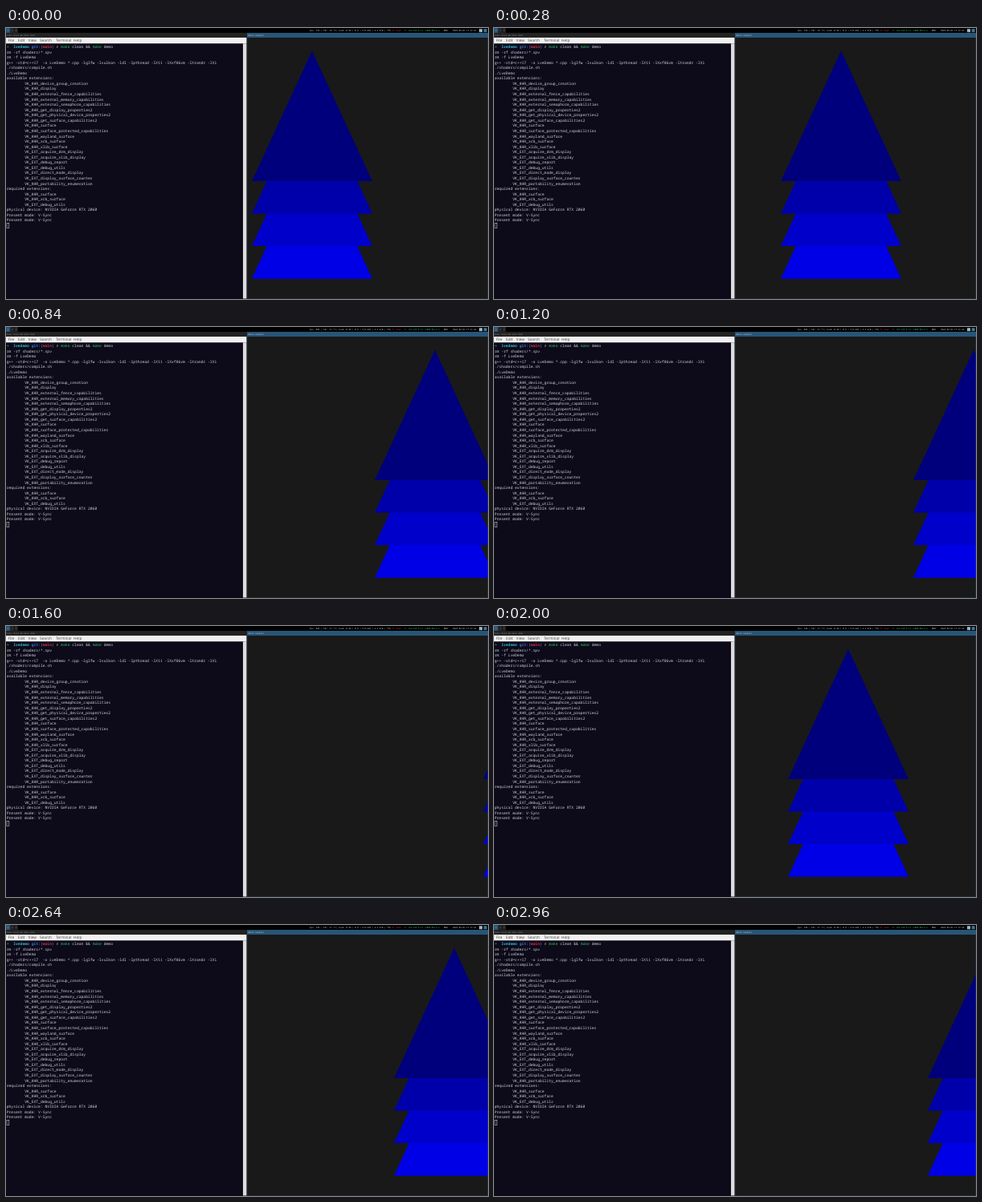
Recreate the animation shown at these times as an HTML page. Size 600x338 px, loop 3000 ms.

```html
<!DOCTYPE html>
<html lang="en">
<head>
<meta charset="utf-8">
<title>Desktop with moving tree</title>
<style>
  html, body { margin: 0; width: 100%; height: 100%; overflow: hidden; background: #000; }
  svg { display: block; width: 600px; height: 338px; }
  text { white-space: pre; text-rendering: geometricPrecision; }
  .term { font: 4.69px "Noto Sans Mono", "DejaVu Sans Mono", monospace; fill: #d2d2d6; }
  .bar { font: 2.57px "Noto Sans Mono", "DejaVu Sans Mono", monospace; fill: #d8d8d8; }
  .menu { font: 4.75px "Noto Sans", "Open Sans", sans-serif; fill: #4a4a4a; }
  .bold { font-weight: 700; }
  .cyan { fill: #2fb5c8; }
  .blue { fill: #3f6fd0; }
  .red { fill: #d8303c; }
  .green { fill: #2fc060; }
  .yellow { fill: #d8b83a; }
  .dim { fill: #888; }
</style>
</head>
<body>
<svg viewBox="0 0 600 338">
  <rect width="600" height="338" fill="#000"/>

  <!-- status bar -->
  <rect width="5.6" height="6" fill="#285577"/>
  <rect x="5.8" width="4.4" height="6" fill="#222"/>
  <rect x="10.4" width="4.4" height="6" fill="#222"/>
  <g class="bar">
    <text x="2" y="4">1</text>
    <text class="dim" x="7.2" y="4">2</text>
    <text class="dim" x="11.8" y="4">3</text>
    <text id="cpu" x="378" y="4"></text>
    <text x="411" y="4">| Load: 0.98 | 0 B | 9.0 GiB | 4.4 GiB | 774</text>
    <text class="red" x="478" y="4">| W: down</text>
    <text class="green" x="496" y="4">E: 192.168.0.12 (1000 Mbit/s)</text>
    <text x="545" y="4">MON:</text>
    <text id="clock" x="556" y="4"></text>
  </g>
  <rect x="589" y="1.2" width="4" height="4" fill="#9fb4c4"/>
  <rect x="594.6" y="1.2" width="4" height="4" fill="#3d7896"/>

  <!-- title bars -->
  <rect y="6" width="300" height="6" fill="#222"/>
  <rect x="300" y="6" width="300" height="6" fill="#285577"/>
  <g class="bar">
    <text class="dim" x="0.8" y="10">make clean &amp;&amp; make demo</text>
    <text x="301" y="10">Hello Vulkan!</text>
  </g>

  <!-- terminal -->
  <rect y="12" width="300" height="326" fill="#0d0a1a"/>
  <rect y="12" width="299.5" height="7.3" fill="#f1f0ef"/>
  <g class="menu">
    <text x="2.6" y="17.3">File</text>
    <text x="15" y="17.3">Edit</text>
    <text x="27.6" y="17.3">View</text>
    <text x="42" y="17.3">Search</text>
    <text x="62" y="17.3">Terminal</text>
    <text x="84" y="17.3">Help</text>
  </g>
  <rect x="295" y="19.3" width="4.5" height="318.2" fill="#dedbd9"/>
  <g id="term" class="term"></g>
  <rect x="1" y="243.3" width="2.8" height="6" fill="none" stroke="#c8c8cc" stroke-width=".6"/>

  <!-- render window -->
  <rect x="300" y="12" width="300" height="326" fill="#191919"/>
  <svg x="300" y="12" width="300" height="325" viewBox="300 12 300 325">
    <g id="tree"></g>
  </svg>
  <path d="M300 12V337.7H599.8V12" fill="none" stroke="#285577" stroke-width=".4"/>
</svg>
<script>
const $ = id => document.getElementById(id);
const NS = "http://www.w3.org/2000/svg";
const CELL = 2.814, LINE = 6.56;

function add(parent, tag, attrs, content = "") {
  const el = document.createElementNS(NS, tag);
  for (const key in attrs) el.setAttribute(key, attrs[key]);
  el.textContent = content;
  parent.appendChild(el);
}

function print(row, col, content, cls = "") {
  add($("term"), "text", { x: 0.7 + col * CELL, y: 25 + row * LINE, class: cls }, content);
}

// prompt: column, text, style
[
  [0, "➜", "green bold"], [3, "lvedemo", "cyan bold"], [11, "git:(", "blue bold"],
  [16, "main", "red bold"], [20, ")", "blue bold"], [22, "✗", "yellow bold"],
  [24, "make", "green"], [29, "clean &&"], [38, "make", "green"], [43, "demo"]
].forEach(part => print(0, ...part));

const extensions = `KHR_device_group_creation KHR_display KHR_external_fence_capabilities
  KHR_external_memory_capabilities KHR_external_semaphore_capabilities
  KHR_get_display_properties2 KHR_get_physical_device_properties2
  KHR_get_surface_capabilities2 KHR_surface KHR_surface_protected_capabilities
  KHR_wayland_surface KHR_xcb_surface KHR_xlib_surface EXT_acquire_drm_display
  EXT_acquire_xlib_display EXT_debug_report EXT_debug_utils EXT_direct_mode_display
  EXT_display_surface_counter KHR_portability_enumeration`.split(/\s+/);
const indent = names => names.map(name => "\tVK_" + name);

[
  "rm -rf shaders/*.spv",
  "rm -f LveDemo",
  "g++ -std=c++17  -o LveDemo *.cpp -lglfw -lvulkan -ldl -lpthread -lX11 -lXxf86vm -lXrandr -lXi",
  "./shaders/compile.sh",
  "./LveDemo",
  "available extensions:",
  ...indent(extensions),
  "required extensions:",
  ...indent(["KHR_surface", "KHR_xcb_surface", "EXT_debug_utils"]),
  "physical device: NVIDIA GeForce RTX 2060",
  "Present mode: V-Sync",
  "Present mode: V-Sync"
].forEach((line, i) => print(i + 1, line[0] === "\t" ? 8 : 0, line.trim()));

// tiers, lowest first so the upper ones overlap
["#00007c", "#0000aa", "#0000cb", "#0000e7"].map((fill, i) => ({ fill, top: 28.4 + i * 40.6 }))
  .reverse()
  .forEach(({ fill, top }) =>
    add($("tree"), "path", { d: `M0 ${top}l75 162.5h-150z`, fill }));

const LOOP = 3000, TICK = 40;
const readings = [["11", 29], ["09", 27], ["14", 27], ["14", 27]];

function draw(now) {
  const t = Math.floor((now % LOOP) / TICK) * TICK;
  // 60 steps a second, 3px each, wrapping after 100
  const step = (2 + Math.ceil(t * 60 / 1000)) % 100;
  $("tree").setAttribute("transform", `translate(${375 + 3 * step} 0)`);

  const second = Math.floor((t + 200) / 1000);
  const [load, temp] = readings[second];
  $("cpu").textContent = `Cpu: ${load}% | Tmr: ${temp} °C`;
  $("clock").textContent = `2024-03-01 17:13:${41 + second}`;
}

const start = performance.now();
function loop() {
  draw(performance.now() - start);
  requestAnimationFrame(loop);
}
loop();
</script>
</body>
</html>
```
